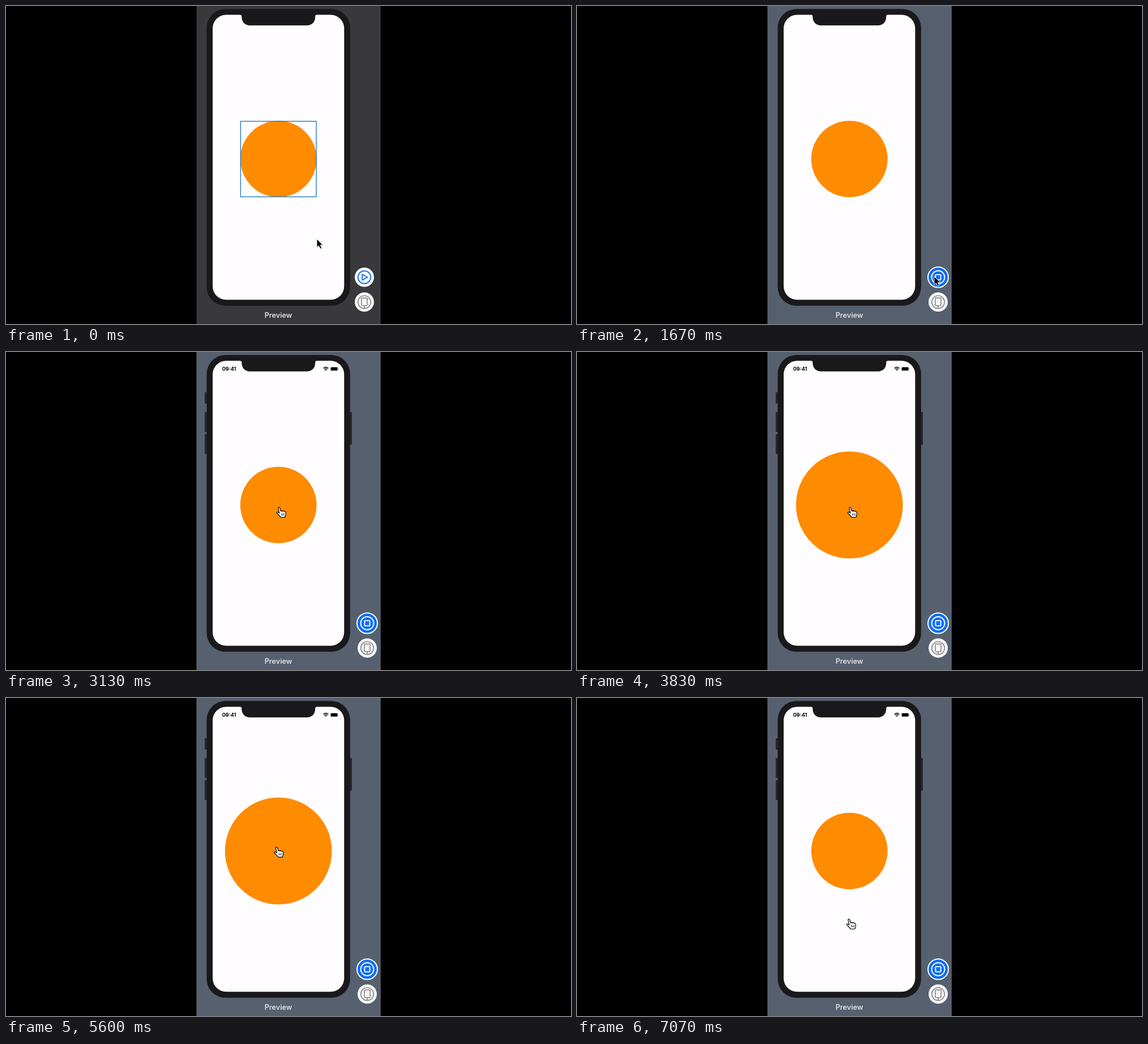
These frames come from a looping animation (998 px wide and 561 px high, 7.53 s). An HTML page:

```html
<!DOCTYPE html>
<html lang="en">
<head>
<meta charset="utf-8">
<title>Preview</title>
<style>
html, body { margin: 0; width: 100%; height: 100%; overflow: hidden; background: #000; }
svg { display: block; width: 100%; height: 100%; }
text { font-family: Inter, "Open Sans", sans-serif; }
</style>
</head>
<body>
<svg viewBox="0 0 998 561">
  <rect width="998" height="561"/>
  <rect x="336.5" width="325.2" height="561" fill="#39383b"/>
  <rect id="slate" x="336.5" width="325.2" height="561" fill="#57606f"/>

  <g id="keys" fill="#24272d">
    <rect x="351" y="71" width="5" height="20" rx="1"/>
    <rect x="351" y="106" width="5" height="35" rx="1"/>
    <rect x="351" y="145" width="5" height="35" rx="1"/>
    <rect x="606" y="106" width="5" height="57.5" rx="1"/>
  </g>
  <rect x="354.5" y="5.3" width="253.3" height="523.5" rx="33" fill="#19181b"/>
  <rect x="365" y="15.5" width="232.3" height="502.8" rx="24" fill="#fffdff"/>
  <path d="M413 15 C415.5 15.3 416.3 16.5 416.3 19 C416.3 28 422 34.2 431 34.2 H531.5 C540.5 34.2 546.2 28 546.2 19 C546.2 16.5 547 15.3 549.5 15 Z" fill="#19181b"/>

  <g id="status">
    <text x="381.8" y="33" font-size="9" font-weight="700">09:41</text>
    <g fill="none" stroke="#000" stroke-width="1.4">
      <path d="M560.6 28.7 Q565 25 569.4 28.7 M562.2 30.5 Q565 28.3 567.8 30.5"/>
    </g>
    <path d="M563.4 31.6 Q565 30.4 566.6 31.6 L565 33.3 Z"/>
    <rect x="573" y="26.4" width="13.2" height="6.8" rx="1.9" fill="#aaa9ab"/>
    <rect x="573.8" y="27.1" width="11.6" height="5.4" rx="1.2"/>
    <rect x="586.7" y="28.6" width="1" height="2.4" rx=".5" fill="#aaa9ab"/>
  </g>

  <circle id="ball" cx="481.2" cy="269.9" r="67.4" fill="#ff8b00"/>
  <rect id="frame" x="414.4" y="203.4" width="133.7" height="133.2" fill="none" stroke="#2479c2" stroke-width="1.4"/>
  <text x="481" y="549.6" font-size="12.6" font-weight="600" fill="#e0e0e3" text-anchor="middle">Preview</text>

  <g id="buttons" fill="none" stroke-linejoin="round">
    <g id="play" stroke="#1877df" stroke-width="1.9">
      <circle cx="633" cy="478.5" r="17" fill="#fff" stroke="none"/>
      <circle cx="633" cy="478.5" r="11.3"/>
      <path d="M629.2 473.4 V483.6 L638.6 478.5 Z"/>
    </g>
    <g id="stop" stroke="#fff" stroke-width="1.9">
      <circle cx="633" cy="478.5" r="18" fill="#0b6dfb" stroke-width="2"/>
      <circle cx="633" cy="478.5" r="11.5"/>
      <rect x="628.4" y="473.9" width="9.2" height="9.2" rx="1"/>
    </g>
    <circle cx="633" cy="522.3" r="17" fill="#f8f8f9"/>
    <g stroke="#8d8c90" stroke-width="1.7">
      <circle cx="633" cy="522.3" r="11.3"/>
      <rect x="628" y="515.2" width="10" height="13.4" rx="1.3" fill="#f8f8f9"/>
      <path d="M633 528.6 V533.6"/>
    </g>
  </g>

  <g id="cursor">
    <g id="arrow">
      <path d="M1 2 V17 L4.3 13.8 L6.8 19 L9.3 17.8 L7 12.8 H11.5 Z" opacity=".15"/>
      <path d="M0 0 V15 L3.4 11.8 L5.9 17.2 L8.6 16 L6.2 10.8 H10.7 Z" stroke="#fff" stroke-width=".9"/>
    </g>
    <g id="hand" stroke="#000" stroke-width="1.2" stroke-linejoin="round">
      <path d="M-1.2 1 C-.6 -.5 1.2 -.3 1.7 1.2 L3.6 7 C4 5.8 6.3 5.8 6.6 7 C7.5 6 9.2 6.3 9.5 7.5 C10.5 7 11.8 7.6 12 9 L12.3 12 C12.3 14 11 15.5 10.8 17.5 H3 C2.5 15.5 -1.5 12.5 -3.5 10.2 C-4.5 8.8 -3 7.8 -1.8 8.6 L.8 10.3 Z" fill="#fff"/>
      <path d="M4.6 10.8 V14.5 M6.9 10.8 V14.5 M9.2 10.8 V14.5" stroke-width=".9"/>
    </g>
  </g>
</svg>
<script>
const LOOP = 7530, TAP = 350;
const taps = [3470, 3850, 4240, 6237];
// Pointer keys: time, x, y
const path = [
  [0, 549, 411], [630, 631, 477], [2200, 631, 477], [2430, 607, 475],
  [2870, 480, 308], [3130, 482, 274], [4890, 482, 274], [5030, 468, 364],
  [5170, 464, 404], [5300, 464, 404], [5630, 478, 260], [6570, 478, 260],
  [7070, 480, 390], [LOOP, 480, 390]
];
const el = id => document.getElementById(id);
const clamp = v => Math.min(1, Math.max(0, v));
const smooth = v => v * v * (3 - 2 * v);
const fade = (t, start, length) => smooth(clamp((t - start) / length));
const show = (id, opacity) => el(id).setAttribute("opacity", opacity);

// Velocity at a key; zero beside a rest or at a turning point
function slope(i, axis) {
  const a = path[i - 1], b = path[i], c = path[i + 1];
  if (!a || !c) return 0;
  const before = (b[axis] - a[axis]) / (b[0] - a[0]);
  const after = (c[axis] - b[axis]) / (c[0] - b[0]);
  return before * after > 0 ? 2 * before * after / (before + after) : 0;
}

function pointer(t, axis) {
  const i = path.findIndex(k => k[0] > t) - 1;
  const a = path[i], b = path[i + 1], span = b[0] - a[0];
  const u = (t - a[0]) / span, v = 1 - u;
  return a[axis] * v * v * (1 + 2 * u) + b[axis] * u * u * (3 - 2 * u)
    + span * u * v * (v * slope(i, axis) - u * slope(i + 1, axis));
}

function draw(now) {
  const t = now % LOOP;
  const live = fade(t, 1350, 350), ready = fade(t, 2080, 120);
  show("slate", live);
  show("play", 1 - live);
  show("stop", live);
  show("frame", 1 - live);
  show("keys", ready);
  show("status", ready);
  el("buttons").setAttribute("transform", `translate(${5 * live} 0)`);

  const grow = taps.reduce((sum, tap, i) => sum + (i % 2 ? -1 : 1) * fade(t, tap, TAP), 0);
  el("ball").setAttribute("r", 67.4 * (1 + 0.4 * grow));

  el("cursor").setAttribute("transform", `translate(${pointer(t, 1)} ${pointer(t, 2)})`);
  show("arrow", t < 2130 ? 1 : 0);
  show("hand", t < 2130 ? 0 : 1);
  requestAnimationFrame(() => draw(performance.now() - start));
}
const start = performance.now();
draw(0);
</script>
</body>
</html>
```
